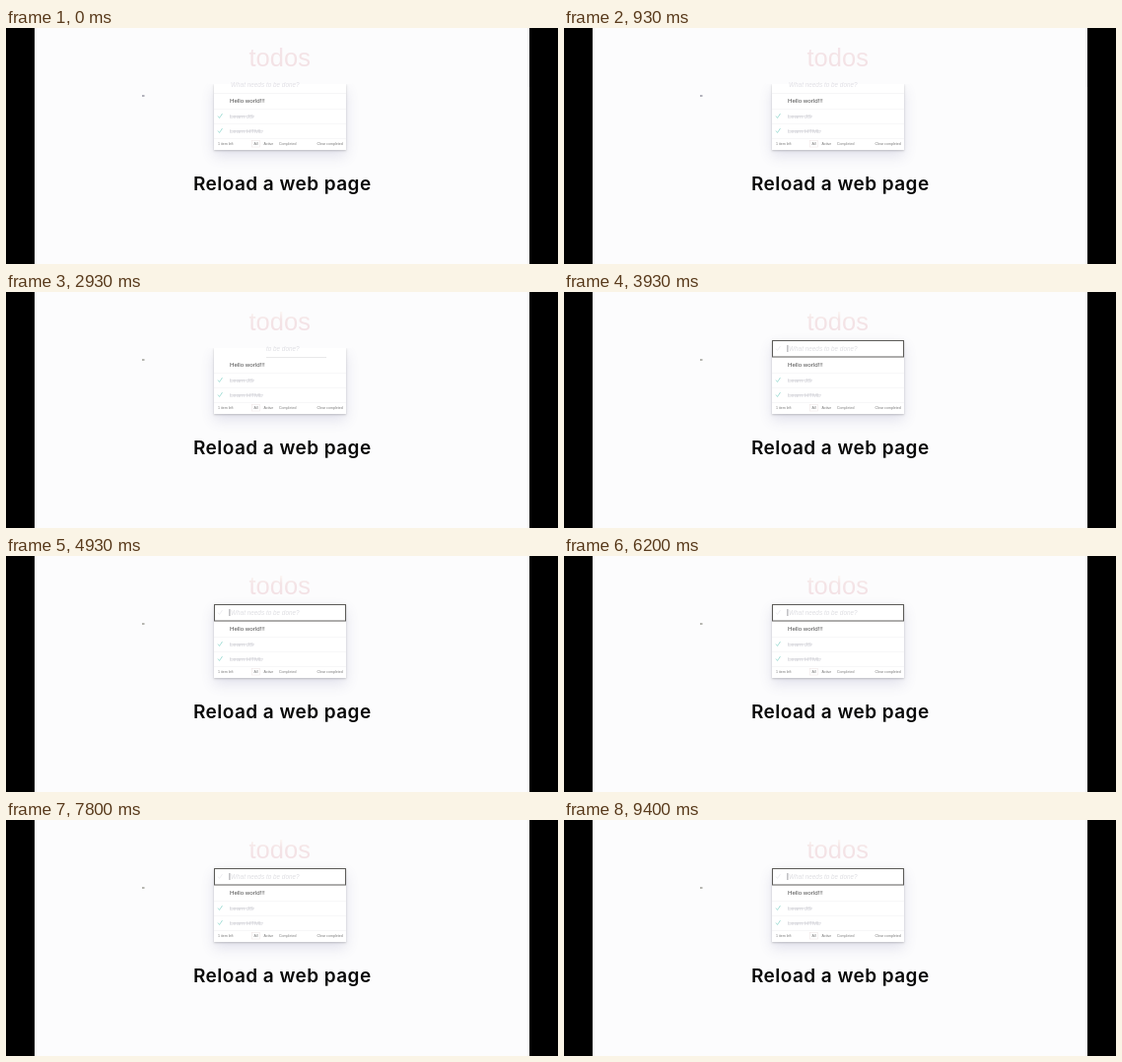
Recreate the animation shown at these times as an HTML page with a canvas. Size 560 by 240 pixels, loop 9470 ms.

```html
<!DOCTYPE html>
<html lang="en">
<head>
<meta charset="utf-8">
<title>Reload a web page</title>
<style>
html, body { margin: 0; width: 100%; height: 100%; overflow: hidden; background: #000; }
canvas { display: block; }
</style>
</head>
<body>
<canvas id="stage" width="560" height="240"></canvas>
<script>
const ctx = document.getElementById('stage').getContext('2d');
const LOOP = 9470;
const RELOAD_AT = 1000;
const FOCUS_AT = 3930;
const SANS = '"Liberation Sans", Arial, sans-serif';
const CARD = { x: 211, y: 49, w: 134, h: 75 };

function rect(x, y, w, h, color) {
  ctx.fillStyle = color;
  ctx.fillRect(x, y, w, h);
}

function text(string, x, y, font, color, spacing = 0) {
  ctx.font = font;
  ctx.fillStyle = color;
  ctx.letterSpacing = spacing + 'px';
  ctx.fillText(string, x, y);
}

function check(x, y, color) {
  ctx.strokeStyle = color;
  ctx.lineWidth = 0.9;
  ctx.beginPath();
  ctx.moveTo(x - 2, y);
  ctx.lineTo(x - 0.5, y + 2);
  ctx.lineTo(x + 2.5, y - 2.5);
  ctx.stroke();
}

function doneItem(label, width, baseline) {
  check(217, baseline - 2.5, '#9fdcd4');
  text(label, 227, baseline, `6px ${SANS}`, '#d2d2d8');
  rect(227, baseline - 2.5, width, 0.8, '#d0d0d6');
}

function drawHeading(reloaded) {
  const ink = ctx.createLinearGradient(0, 20, 0, 40);
  ink.addColorStop(0, reloaded ? '#fbf6f3' : '#f4e4ea');
  ink.addColorStop(0.4, '#f4e4e6');
  ink.addColorStop(1, '#f3e1e5');
  text('todos', 246.5, 39, `25.5px ${SANS}`, ink);
}

function drawCard(top) {
  const height = CARD.y + CARD.h - top;
  ctx.save();
  ctx.shadowColor = 'rgba(90, 90, 150, 0.16)';
  ctx.shadowBlur = 13;
  ctx.shadowOffsetY = 6;
  rect(CARD.x, top, CARD.w, height, '#fff');
  ctx.shadowColor = 'rgba(0, 0, 0, 0.2)';
  ctx.shadowBlur = 2;
  ctx.shadowOffsetY = 0.5;
  rect(CARD.x, top, CARD.w, height, '#fff');
  ctx.restore();
  for (const y of [82, 97, 112]) rect(CARD.x, y, CARD.w, 0.6, '#f2f2f4');
}

function drawInput(reloaded, focused) {
  const hint = `italic 6.4px ${SANS}`;
  if (focused) {
    rect(CARD.x, CARD.y, CARD.w, 17, '#fff');
    check(217, 57.5, '#ededf0');
    text('What needs to be done?', 228, 60, hint, '#dedee2');
    rect(226.5, 54, 0.8, 7, '#85858c');
    ctx.strokeStyle = '#5c5b58';
    ctx.lineWidth = 1;
    ctx.strokeRect(211.5, 49.5, 133, 16.5);
    return;
  }
  // Only part of the field is painted before it receives focus.
  rect(CARD.x - 6, 46, CARD.w + 12, 11, '#fcfcfd');
  ctx.save();
  ctx.beginPath();
  ctx.rect(reloaded ? 263 : 227, 53, 82, 10);
  ctx.clip();
  text('What needs to be done?', 228, 60, hint, reloaded ? '#dedee3' : '#e0dfe5');
  ctx.restore();
  if (reloaded) rect(264, 66, 61, 0.7, '#dedee0');
  else rect(CARD.x, 66, CARD.w, 0.6, '#f0f0f2');
}

function drawFooter() {
  const small = `3.6px ${SANS}`;
  const labels = [['1 item left', 215], ['All', 251.5], ['Active', 261.5],
                  ['Completed', 277], ['Clear completed', 315.5]];
  for (const [label, x] of labels) text(label, x, 119, small, '#777');
  ctx.strokeStyle = '#eee4e4';
  ctx.lineWidth = 0.5;
  ctx.strokeRect(249.5, 114.5, 8, 6.5);
}

function draw(time) {
  const reloaded = time >= RELOAD_AT;
  const focused = time >= FOCUS_AT;
  rect(0, 0, 560, 240, '#000');
  rect(29, 0, 502, 240, '#fcfcfd');
  if (!reloaded) rect(529.5, 0, 1.5, 60, '#ededf0');

  drawHeading(reloaded);
  drawCard(focused ? CARD.y : 57);
  drawInput(reloaded, focused);
  text('Hello world!!!', 227, 76, `6.2px ${SANS}`, '#4d4d4d');
  doneItem('Learn JS', 25, 92);
  doneItem('Learn HTML', 34, 107);
  drawFooter();

  rect(138, 68, 2.5, 2, reloaded ? '#b5b5b0' : '#b0b0ba');
  text('Reload a web page', 190, 165, '600 19px Inter, sans-serif', '#080808', 0.45);
}

function tick(now) {
  draw(now % LOOP);
  requestAnimationFrame(tick);
}

draw(0);
requestAnimationFrame(tick);
</script>
</body>
</html>
```
